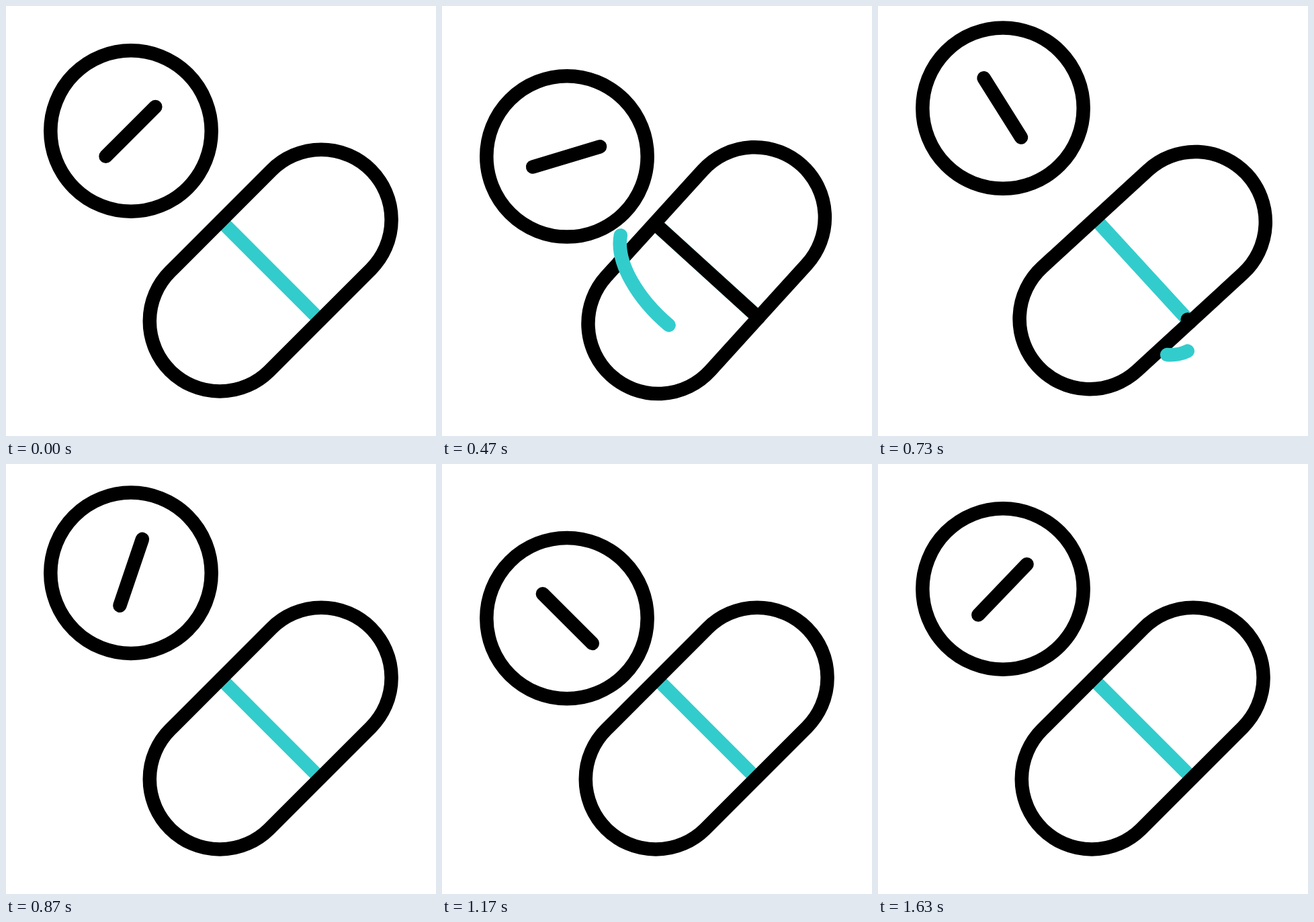
An HTML page for the animation above (1.67 s loop, 640 px wide and 640 px high).

```html
<!DOCTYPE html>
<html lang="en">
<head>
<meta charset="utf-8">
<title>Pills</title>
<style>
  html, body { margin: 0; height: 100%; overflow: hidden; background: #fff; }
  svg { display: block; width: 100%; height: 100%; fill: none; stroke: #000; stroke-width: 20.5; stroke-linecap: round; }
  .teal { stroke: #3cc; }
</style>
</head>
<body>
<svg viewBox="0 0 640 640">
  <g id="capsule">
    <path class="teal" d="M0-104.4V104.4"/>
    <path id="divider" pathLength="1" d="M0-104.4V104.4"/>
    <rect x="-211.2" y="-104.4" width="422.4" height="208.8" rx="104.4"/>
  </g>
  <g id="tablet">
    <circle r="119.7"/>
    <path id="score" d="M-53.2.2H51.2"/>
  </g>
  <path id="swoosh" class="teal" pathLength="1" d="M271 326C232 402 386 550 461 513.5"/>
</svg>
<script>
const LOOP = 1670, FRAMES = 50, FPS = 30;
const [capsule, divider, tablet, score, swoosh] =
  ['capsule', 'divider', 'tablet', 'score', 'swoosh'].map(id => document.getElementById(id));

// cubic-bezier(.42, 0, .58, 1)
function easeInOut(x) {
  let lo = 0, hi = 1;
  for (let i = 0; i < 24; i++) {
    const t = (lo + hi) / 2, s = 1 - t;
    if (1.26 * t * s * s + 1.74 * t * t * s + t * t * t < x) lo = t; else hi = t;
  }
  return lo * lo * (3 - 2 * lo);
}

// Eased value at a frame, from [frame, value] keys
function track(frame, keys) {
  if (frame <= keys[0][0]) return keys[0][1];
  for (let i = 1; i < keys.length; i++) {
    const [t0, v0] = keys[i - 1], [t1, v1] = keys[i];
    if (frame < t1) return v0 + (v1 - v0) * easeInOut((frame - t0) / (t1 - t0));
  }
  return keys[keys.length - 1][1];
}

function trim(path, from, to) {
  path.style.display = to - from > 0.0005 ? '' : 'none';
  path.setAttribute('stroke-dasharray', `${to - from} 2`);
  path.setAttribute('stroke-dashoffset', -from);
}

function draw(frame) {
  const at = (...keys) => track(frame, keys);
  const tilt = at([2.5, -45], [8.5, -35], [16.5, -51], [21.3, -42.4], [25.5, -45]);
  const height = at([5, 186], [11.9, 229.8], [22.85, 151.2], [34.9, 229.6], [47, 186]);
  const spin = at([5, -45], [50.9, 315]);

  capsule.setAttribute('transform', `translate(393.7 393.6) rotate(${tilt})`);
  tablet.setAttribute('transform', `translate(186 ${height})`);
  score.setAttribute('transform', `rotate(${spin})`);
  trim(divider, at([13.4, 0], [23.1, 1]), at([2.8, 0], [13.2, 1]));
  trim(swoosh, at([11.9, 0], [24.9, 1]), at([4.3, 0], [22.4, 1]));
}

function tick() {
  const ms = performance.now() % LOOP;
  draw(Math.min(FRAMES - 1, Math.floor((ms + 4) * FPS / 1000)));
  requestAnimationFrame(tick);
}
tick();
</script>
</body>
</html>
```
